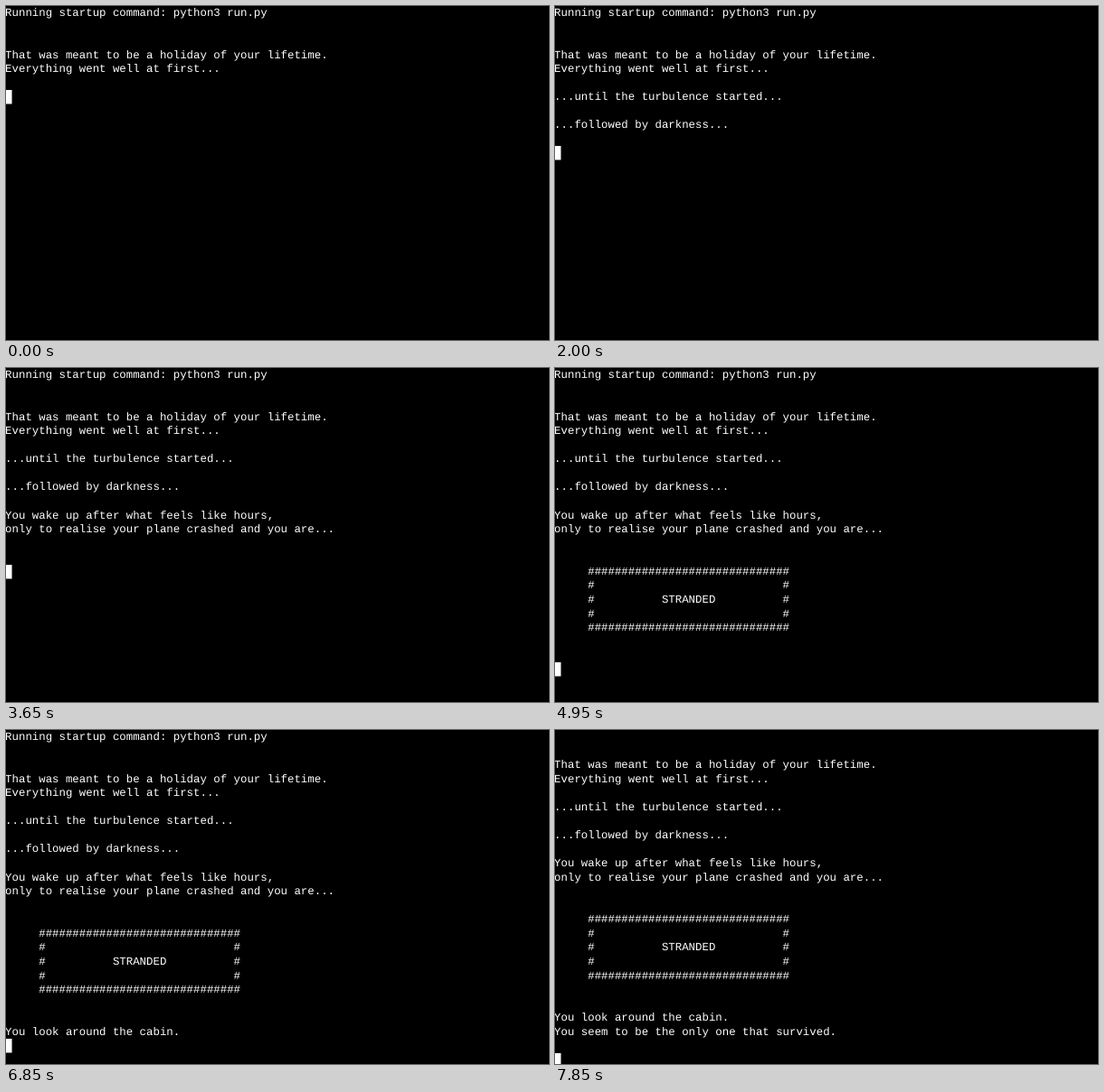
Write an HTML page with a canvas that moves like this. It is 600 px wide and 370 px high and loops after 8 s.

```html
<!DOCTYPE html>
<html lang="en">
<head>
<meta charset="utf-8">
<style>
  html, body { margin: 0; width: 600px; height: 370px; overflow: hidden; background: #000; }
  canvas { display: block; }
</style>
</head>
<body>
<canvas id="term" width="600" height="370"></canvas>
<script>
const ctx = document.getElementById('term').getContext('2d');
const LOOP = 8000, ROWS = 24, PITCH = 15.56, CELL = 7.43, LEFT = -0.9;

const indent = ' '.repeat(5);
const rule = indent + '#'.repeat(30);
const side = text => indent + '#' + text.padEnd(28) + '#';

// Each print: the time it happens and the lines it adds.
const prints = [
  [0, ['Running startup command: python3 run.py', '', '',
       'That was meant to be a holiday of your lifetime.',
       'Everything went well at first...', '']],
  [950, ['...until the turbulence started...', '']],
  [1950, ['...followed by darkness...', '']],
  [2950, ['You wake up after what feels like hours,',
          'only to realise your plane crashed and you are...', '', '']],
  [4950, [rule, side(''), side(' '.repeat(10) + 'STRANDED'), side(''), rule, '', '']],
  [5950, ['You look around the cabin.']],
  [6950, ['You seem to be the only one that survived.', '']],
];

function draw(t) {
  const lines = prints.filter(([start]) => t >= start).flatMap(([, text]) => text);
  const scroll = Math.max(0, lines.length + 1 - ROWS);
  ctx.clearRect(0, 0, 600, 370);
  ctx.fillStyle = '#fff';
  ctx.font = '12.38px "Liberation Mono", monospace';
  ctx.textRendering = 'geometricPrecision';
  lines.slice(scroll).forEach((line, row) => ctx.fillText(line, LEFT, 11 + row * PITCH));
  const top = Math.round((lines.length - scroll) * PITCH - 0.3);
  ctx.fillRect(LEFT, top, CELL, 15.5);
}

function tick() {
  draw(performance.now() % LOOP);
  requestAnimationFrame(tick);
}
tick();
</script>
</body>
</html>
```
